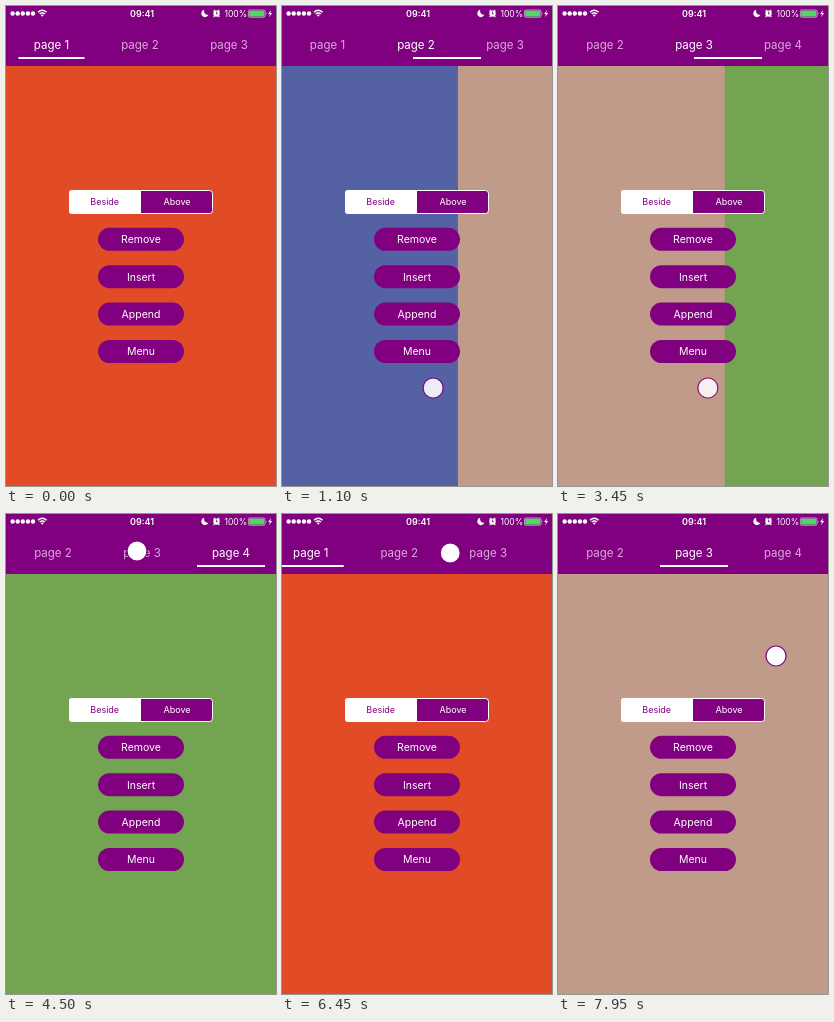
Recreate the animation shown at these times as an HTML page. Size 270 by 480 pixels, loop 8 s.

```html
<!DOCTYPE html>
<html lang="en">
<head>
<meta charset="utf-8">
<title>Paging menu</title>
<style>
  html, body { margin: 0; width: 100%; height: 100%; overflow: hidden; background: #800080; }
  svg { display: block; width: 100%; height: 100%; }
  text { font-family: Inter, Roboto, sans-serif; text-anchor: middle; fill: #fff; }
  #tabs text { font-size: 11.5px; }
  #buttons text { font-size: 10.5px; }
  .segment { font-size: 9px; }
  .status { font-size: 9px; font-weight: 600; }
</style>
</head>
<body>
<svg viewBox="0 0 270 480">
  <rect id="current" width="270" height="480"/>
  <rect id="incoming" width="270" height="480"/>
  <rect width="270" height="60" fill="#800080"/>

  <g fill="#fff">
    <g id="signal"></g>
    <g fill="none" stroke="#fff" stroke-width="1.4">
      <path d="M32 6.3Q36.3 2.3 40.6 6.3M33.7 8.1Q36.3 5.7 38.9 8.1"/>
    </g>
    <path d="M34.9 9.2Q36.3 8 37.7 9.2L36.3 10.7Z"/>
    <text class="status" x="136" y="10.8">09:41</text>
    <path d="M198.2 3.8A3.7 3.7 0 1 0 202.4 8.8A3.8 3.8 0 0 1 198.2 3.8Z"/>
    <circle cx="210.5" cy="7.6" r="3.2"/>
    <path d="M207.4 5.4l1.8-1.6M213.6 5.4l-1.8-1.6M208.5 10l-.9 1.2M212.5 10l.9 1.2" stroke="#fff" stroke-width="1.1"/>
    <path d="M210.5 5.6v2.2h1.6" fill="none" stroke="#800080" stroke-width=".8"/>
    <text class="status" x="229.8" y="10.7" style="font-size:8.6px;font-weight:400">100%</text>
    <rect x="242.4" y="4" width="16.6" height="7.2" rx="1.4" fill="none" stroke="#fff" stroke-width=".6"/>
    <rect x="243.2" y="4.8" width="15" height="5.6" rx=".7" fill="#4cd964"/>
    <path d="M259.8 6.3q1.2 1.3 0 2.6zM265 4l-2.8 4h1.7l-.8 3.2 3-4.2h-1.8z"/>
  </g>

  <g id="tabs"><rect id="indicator" y="51" height="2" fill="#fff"/></g>

  <rect x="63.5" y="184.5" width="143" height="23" rx="3" fill="#800080" stroke="#fff"/>
  <path d="M135 184H66a3 3 0 0 0-3 3v18a3 3 0 0 0 3 3h69z" fill="#fff"/>
  <text class="segment" x="98.7" y="199.3" style="fill:#800080">Beside</text>
  <text class="segment" x="171" y="199.3">Above</text>
  <g id="buttons"></g>

  <circle id="touch" r="10" fill="#fff" stroke="#800080" stroke-width="1.2"/>
</svg>
<script>
const LOOP = 8000, WIDTH = 270;
const COLORS = ['#e14c26', '#5461a3', '#c09b8a', '#73a452'];
const CENTERS = [45.5, 134, 223, 312];
const RELEASE = 150, RELEASED_AT = 0.344;
const $ = id => document.getElementById(id);

function add(parent, tag, attrs, text = '') {
  const node = document.createElementNS('http://www.w3.org/2000/svg', tag);
  set(node, attrs);
  node.textContent = text;
  return parent.appendChild(node);
}
function set(node, attrs) {
  for (const key in attrs) node.setAttribute(key, attrs[key]);
}

for (let i = 0; i < 5; i++) add($('signal'), 'circle', { cx: 6.6 + i * 5.1, cy: 7.5, r: 2.2 });
['Remove', 'Insert', 'Append', 'Menu'].forEach((label, i) => {
  const y = 233.3 + i * 37.4;
  add($('buttons'), 'rect', { x: 92, y: y - 11.5, width: 86, height: 23, rx: 11.5, fill: '#800080' });
  add($('buttons'), 'text', { x: 135, y: y + 3.8 }, label);
});
const labels = CENTERS.map((x, i) => add($('tabs'), 'text', { x, y: 43 }, `page ${i + 1}`));

const clamp = v => Math.min(1, Math.max(0, v));
const linear = v => v;
const easeOut = v => 1 - (1 - v) ** 3;
const smooth = v => Math.sin(v * Math.PI / 2) ** 2;

// Finger drag followed by a decelerating snap.
function swipeProgress(time) {
  if (time < RELEASE) return RELEASED_AT * clamp((time - 40) / (RELEASE - 40));
  return RELEASED_AT + (1 - RELEASED_AT) * easeOut(clamp((time - RELEASE) / 450));
}
const tapProgress = time => smooth(clamp((time - 75) / 310));

const moves = [
  { start: 200, from: 0, to: 1, swipe: true, slow: 1.2 },
  { start: 950, from: 1, to: 2, swipe: true, slow: 1 },
  { start: 3300, from: 2, to: 3, swipe: true, slow: 0.95 },
  { start: 5500, from: 3, to: 0 },
  { start: 7100, from: 0, to: 2 },
];

// Tab bar scroll: [time, offset, easing towards it]
const scrollKeys = [
  [0, 0], [2700, 0], [2700, 87], [4530, 87], [4800, 30, linear], [5350, 3, easeOut],
  [5575, 3], [5885, 0, smooth], [6380, 0], [6600, 52, linear], [6950, 81, easeOut],
  [7175, 81], [7485, 87, smooth], [LOOP, 87],
];
function scrollAt(t) {
  const i = scrollKeys.findIndex(key => key[0] > t);
  const [t0, v0] = scrollKeys[i - 1], [t1, v1, ease = linear] = scrollKeys[i];
  return v0 + (v1 - v0) * ease((t - t0) / (t1 - t0));
}

const touches = [
  ...moves.filter(m => m.swipe).map(({ start, slow }) => ({
    start, hold: 130 * slow, y: 382,
    x: t => 244 - WIDTH * swipeProgress((t - start) / slow),
  })),
  { start: 2500, hold: 200, fade: 350, x: () => 150, y: 300 },
  { start: 4500, hold: 300, x: t => 218 - scrollAt(t), y: 37 },
  { start: 5500, hold: 50, x: () => 53, y: 38 },
  { start: 6350, hold: 250, x: t => 185 - scrollAt(t), y: 39 },
  { start: 7100, hold: 50, x: () => 165, y: 42 },
  { start: 7950, hold: 100, x: () => 218, y: 142 },
];

function drawPages(t) {
  const move = moves.findLast(m => m.start <= t) || moves[0];
  const { from, to, swipe, slow } = move;
  const time = t - move.start;
  const progress = swipe ? swipeProgress(time / slow) : tapProgress(time);
  set($('current'), { fill: COLORS[from] });
  set($('incoming'), { fill: COLORS[to], x: Math.sign(to - from) * WIDTH * (1 - progress) });
  return swipe ? from + (to - from) * progress : time < 75 ? from : to;
}

function drawTabs(t, position) {
  const left = Math.floor(position), part = position - left;
  const center = CENTERS[left] + part * ((CENTERS[left + 1] || 0) - CENTERS[left]);
  const width = 66 + 2 * clamp(position);
  set($('indicator'), { x: center - width / 2, width });
  set($('tabs'), { transform: `translate(${-scrollAt(t)} 0)` });
  labels.forEach((label, i) => {
    label.style.fill = i === Math.round(position) ? '#fff' : '#d9aad9';
  });
}

function drawTouch(t) {
  const touch = touches.find(({ start, hold, fade = 200 }) => t >= start && t < start + hold + fade);
  if (!touch) return set($('touch'), { opacity: 0 });
  const { start, hold, fade = 200, x, y } = touch;
  set($('touch'), {
    cx: x(Math.min(t, start + hold + 20)), cy: y,
    opacity: 1 - clamp((t - start - hold) / fade),
  });
}

function frame(now) {
  const t = now % LOOP;
  drawTabs(t, drawPages(t));
  drawTouch(t);
  requestAnimationFrame(frame);
}
requestAnimationFrame(frame);
</script>
</body>
</html>
```
